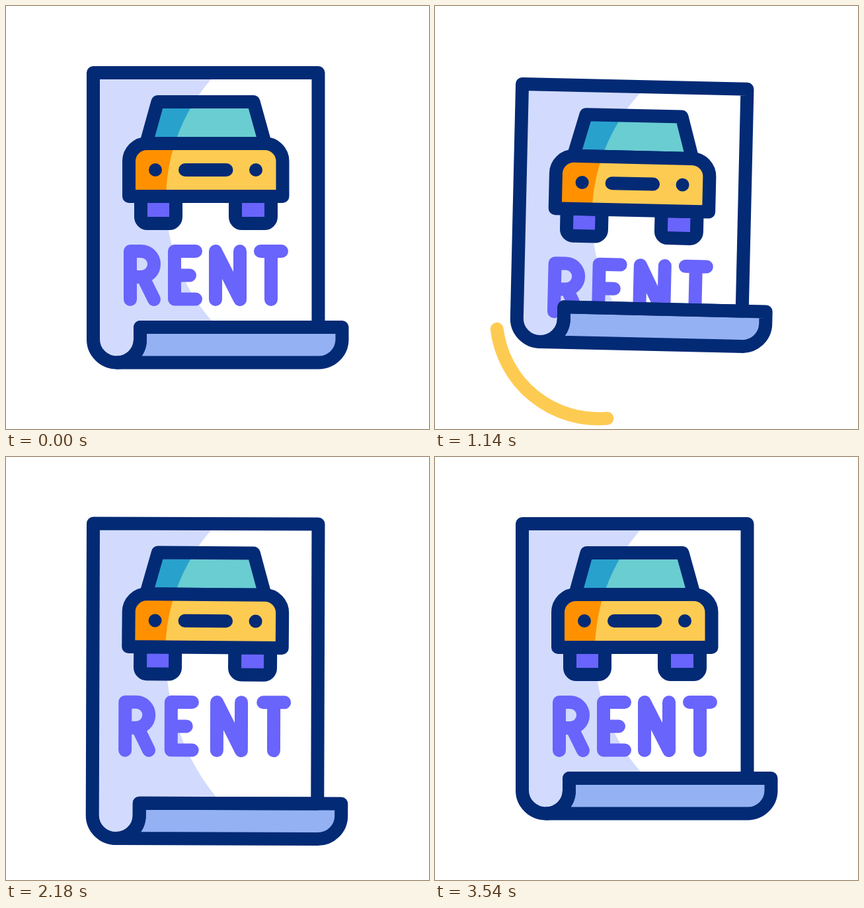
Animation of 640x640 px, one loop 3600 ms. Source, as an HTML page with a canvas:

```html
<!DOCTYPE html>
<html lang="en">
<head>
<meta charset="utf-8">
<title>Rent</title>
<style>
html, body { margin: 0; width: 100%; height: 100%; overflow: hidden; background: #fff; }
canvas { display: block; width: 640px; height: 640px; }
</style>
</head>
<body>
<canvas id="stage" width="640" height="640" role="img" aria-label="RENT"></canvas>
<script>
const ctx = document.getElementById('stage').getContext('2d');
const LOOP = 3600;
const DEG = Math.PI / 180;
const NAVY = '#032a75', LAVENDER = '#d2dbfd', FLAP = '#94b1f3', PURPLE = '#6964fb';
const YELLOW = '#fecb52', ORANGE = '#ff9100', TEAL = '#69cdd1', BLUE = '#29a1cd';

// Keyframes: [time in ms, value], eased in and out between neighbours.
const tracks = {
  lift:   [[200, 0], [700, -47], [1150, 21], [1660, 0]],
  unroll: [[200, 0], [705, -231], [1407, 38], [3250, 38], [3540, 0]],
  tilt:   [[500, 0], [920, 5], [1456, -5], [1960, 5], [2410, -5], [2750, 0]],
  sway:   [[1140, 0], [1460, -2], [1890, 3.1], [2460, -2.4], [3040, 2.3], [3540, 0]],
  spread: [[1100, 0], [1880, 16.5], [2470, -4], [3050, 13.5], [3540, 0]]
};

// Circular swooshes that draw on, then wipe off from their first end.
const swooshes = [
  { x: 247, y: 470, r: 154.5, from: 173, to: 85, on: [900, 1120], off: [1265, 1480] },
  { x: 431.5, y: 253.5, r: 154.5, from: -7, to: -58, on: [3120, 3330], off: [3410, 3540] }
];

const letters = [
  { shift: -1.15, d: 'M188 444V371H204.5A19.5 19.5 0 0 1 204.5 410H188M207.5 410.5L224 444' },
  { shift: -0.72, d: 'M287 371H255V443.5H287M255 407.5H278' },
  { shift: 0.48, d: 'M317 444V371L354 444V371' },
  { shift: 0.83, d: 'M385 371H417M401 371V444' }
].map(l => ({ shift: l.shift, path: new Path2D(l.d) }));

const roof = new Path2D('M212 208L229.5 145H374.5L392 208Z');
const body = new Path2D('M186 288V235A27 27 0 0 1 213 208H391.5A27 27 0 0 1 418.5 235V288Z');
const grille = new Path2D('M271 248H333.5');
const wheels = [[204, 257], [347, 401]].map(([l, r]) => new Path2D(
  `M${l} 288V319A10 10 0 0 0 ${l + 10} 329H${r - 10}A10 10 0 0 0 ${r} 319V288Z`));

const clamp = v => Math.max(0, Math.min(1, v));
const ease = f => f * f * (3 - 2 * f);
const progress = (t, [a, b]) => ease(clamp((t - a) / (b - a)));

function valueAt(keys, t) {
  let value = keys[0][1];
  for (let i = 1; i < keys.length; i++) {
    const [t0, v0] = keys[i - 1], [t1, v1] = keys[i];
    if (t >= t0) value = v0 + (v1 - v0) * progress(t, [t0, t1]);
  }
  return value;
}

function fill(path, color) {
  ctx.fillStyle = color;
  ctx.fill(path);
}

function stroke(path, color) {
  ctx.strokeStyle = color;
  ctx.stroke(path);
}

function rotateAbout(x, y, degrees) {
  ctx.translate(x, y);
  ctx.rotate(degrees * DEG);
  ctx.translate(-x, -y);
}

function lightSide(stretch = 1) {
  const p = new Path2D();
  p.ellipse(519, 293, 277, 277, 0, Math.PI, Math.PI * 2);
  p.ellipse(519, 293, 277, 277 * stretch, 0, 0, Math.PI);
  return p;
}

function twoTone(path, shade, light) {
  fill(path, shade);
  ctx.save();
  ctx.clip(path);
  fill(lightSide(), light);
  ctx.restore();
}

function drawCar(sway) {
  ctx.save();
  rotateAbout(302, 248, sway);
  for (const wheel of wheels) {
    fill(wheel, PURPLE);
    stroke(wheel, NAVY);
  }
  twoTone(roof, BLUE, TEAL);
  stroke(roof, NAVY);
  twoTone(body, ORANGE, YELLOW);
  stroke(body, NAVY);
  stroke(grille, NAVY);
  for (const x of [226, 378]) {
    const light = new Path2D();
    light.arc(x, 248, 10, 0, Math.PI * 2);
    fill(light, NAVY);
  }
  ctx.restore();
}

function drawText(spread) {
  for (const { shift, path } of letters) {
    ctx.save();
    ctx.translate(shift * spread, 0);
    stroke(path, PURPLE);
    ctx.restore();
  }
}

function drawPaper(pose) {
  const top = 486 + pose.unroll, mid = top + 18.5, bottom = top + 53.5;
  const sheet = new Path2D(`M132 101H472.5V${top}H203V${mid}A35.5 35 0 0 1 168 ${bottom}A36 35 0 0 1 132 ${mid}Z`);
  const flap = new Path2D(`M203 ${top}H508.5V${mid}A35.5 35 0 0 1 473 ${bottom}H168A35 35 0 0 0 203 ${mid}Z`);

  ctx.save();
  ctx.translate(0, pose.lift);
  rotateAbout(302, 101, pose.tilt);

  fill(sheet, LAVENDER);
  ctx.save();
  ctx.clip(sheet);
  fill(lightSide(1 + Math.max(0, pose.unroll) / 247), '#fff');
  drawCar(pose.sway);
  drawText(pose.spread);
  ctx.restore();

  fill(flap, FLAP);
  stroke(sheet, NAVY);
  stroke(flap, NAVY);
  ctx.restore();
}

function drawSwoosh(s, t) {
  const head = progress(t, s.on), tail = progress(t, s.off);
  if (head <= tail) return;
  const angle = f => (s.from + (s.to - s.from) * f) * DEG;
  const p = new Path2D();
  p.arc(s.x, s.y, s.r, angle(tail), angle(head), true);
  stroke(p, YELLOW);
}

function draw(t) {
  const pose = {};
  for (const name in tracks) pose[name] = valueAt(tracks[name], t);
  ctx.fillStyle = '#fff';
  ctx.fillRect(0, 0, 640, 640);
  ctx.lineWidth = 20;
  ctx.lineCap = ctx.lineJoin = 'round';
  swooshes.forEach(s => drawSwoosh(s, t));
  drawPaper(pose);
}

let start;
function tick(now) {
  start ??= now;
  draw((now - start) % LOOP);
  requestAnimationFrame(tick);
}
draw(0);
requestAnimationFrame(tick);
</script>
</body>
</html>
```
